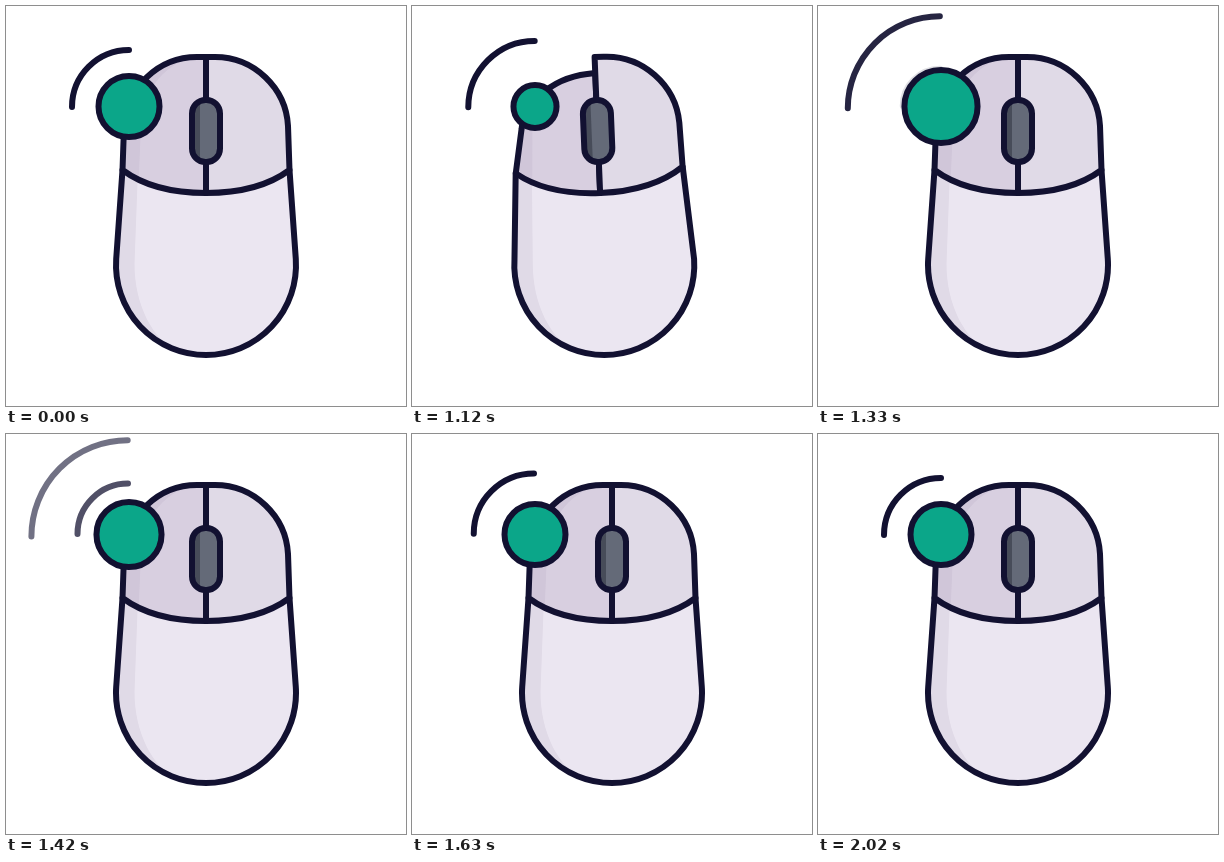
Recreate the animation shown at these times as an HTML page. Size 400x400 px, loop 2.05 s.

```html
<!DOCTYPE html>
<html lang="en">
<head>
<meta charset="utf-8">
<title>Mouse click</title>
<style>
  html, body { margin: 0; height: 100%; overflow: hidden; background: #fff; }
  svg { display: block; width: 100%; height: 100%; }
</style>
</head>
<body>
<svg viewBox="0 0 400 400" fill="none" stroke="#121131" stroke-width="6"
  stroke-linecap="round" stroke-linejoin="round">
  <defs>
    <path id="body"/>
    <path id="leftButton"/>
    <rect id="wheel" x="186" y="94" width="28" height="62" rx="13.5"/>
    <clipPath id="bodyClip"><use href="#body"/></clipPath>
    <clipPath id="leftClip"><use href="#leftButton"/></clipPath>
    <clipPath id="wheelClip"><use href="#wheel"/></clipPath>
  </defs>
  <use href="#body" fill="#ebe6f1" stroke="none"/>
  <path id="bodyShade" clip-path="url(#bodyClip)" fill="#e0dae7" stroke="none"/>
  <use href="#body"/>
  <g id="top">
    <use href="#leftButton" fill="#d8cfe0" stroke="none"/>
    <path clip-path="url(#leftClip)" fill="#d0c6d9" stroke="none"
      d="M100 190H132L135 120C137 86 156 60 185 52L100 40Z"/>
    <use href="#leftButton"/>
    <path fill="#e0dae7" d="M200 187V51H209C248 51 280 82 282 120L283.5 164C262 180 233 187 200 187Z"/>
    <use href="#wheel" fill="#646a78" stroke="none"/>
    <path clip-path="url(#wheelClip)" fill="#474c59" stroke="none" d="M180 90H194V160H180Z"/>
    <use href="#wheel"/>
  </g>
  <path id="oldArc"/>
  <path id="newArc"/>
  <circle id="dot" cx="123" cy="100.5" fill="#0ba689"/>
</svg>
<script>
const LOOP = 2050, START = 1030, STEP = 30;
const set = (id, attrs) => {
  const node = document.getElementById(id);
  for (const name in attrs) node.setAttribute(name, attrs[name]);
};
const ramp = (t, a, b) => Math.min(1, Math.max(0, (t - a) / (b - a)));
const smooth = u => u * u * (3 - 2 * u);

// Eased value at time t from [time, value] pairs
function track(t, keys) {
  let value = keys[0][1];
  for (let i = 1; i < keys.length; i++) {
    const [t0, v0] = keys[i - 1], [t1, v1] = keys[i];
    if (t >= t0) value = v0 + (v1 - v0) * smooth(ramp(t, t0, t1));
  }
  return value;
}

const quarter = (cx, cy, r) => `M${cx - r} ${cy}A${r} ${r} 0 0 1 ${cx} ${cy - r}`;

// p: how far the left button is pressed
function drawMouse(p) {
  const lean = 14.3 * p, slide = 8.6 * p, tilt = 3.8 * p;
  set('top', { transform: `translate(${-lean} 0) rotate(${-2.6 * p} 200 164)` });
  set('body', {
    d: `M${116.5 - lean} ${164 + tilt}L${110.2 - slide} 253` +
      `A90 90 0 1 0 ${289.8 - slide} 253L${283.5 - lean} ${164 - tilt}`
  });
  set('bodyShade', {
    d: `M80 150H${132.5 - lean}L${128.5 - slide} 258` +
      `C${128.5 - slide} 298 ${146 - slide} 334 ${174 - slide} 347L80 360Z`
  });
  set('leftButton', {
    d: `M116.5 164L${118 + 6.8 * p} ${121 - p}` +
      `C${120 + 7 * p} ${82 + 18 * p} ${152 + p} ${51 + 22 * p} ${191 + p} ${51 + 18.5 * p}` +
      `L200 ${51 + 17.8 * p}V187C167 187 138 180 116.5 164Z`
  });
}

function draw(now) {
  const time = now % LOOP;
  // Motion advances in steps after the rest
  const active = time >= START;
  const t = active ? START + Math.floor((time - START) / STEP) * STEP : 0;

  drawMouse(track(t, [[1000, 0], [1150, 1], [1300, 0]]));
  set('dot', { r: track(t, [[1000, 30.5], [1150, 20.5], [1340, 36.7], [1500, 28.4], [1620, 30.5]]) });

  const grow = smooth(ramp(t, 980, 1420));
  set('oldArc', {
    d: quarter(123 - 1.3 * grow, 101 + 1.5 * grow, 57 + 39.3 * grow),
    opacity: 1 - ramp(t, 1305, 1590)
  });

  const settle = smooth(ramp(t, 1780, 2000));
  set('newArc', {
    d: quarter(122 + settle, track(t, [[1540, 100], [1780, 99.2], [2000, 101]]),
      track(t, [[1300, 36], [1540, 65], [1780, 50], [2000, 57]])),
    opacity: active ? ramp(t, 1310, 1460) : 0
  });
  requestAnimationFrame(() => draw(performance.now() - origin));
}

const origin = performance.now();
draw(0);
</script>
</body>
</html>
```
